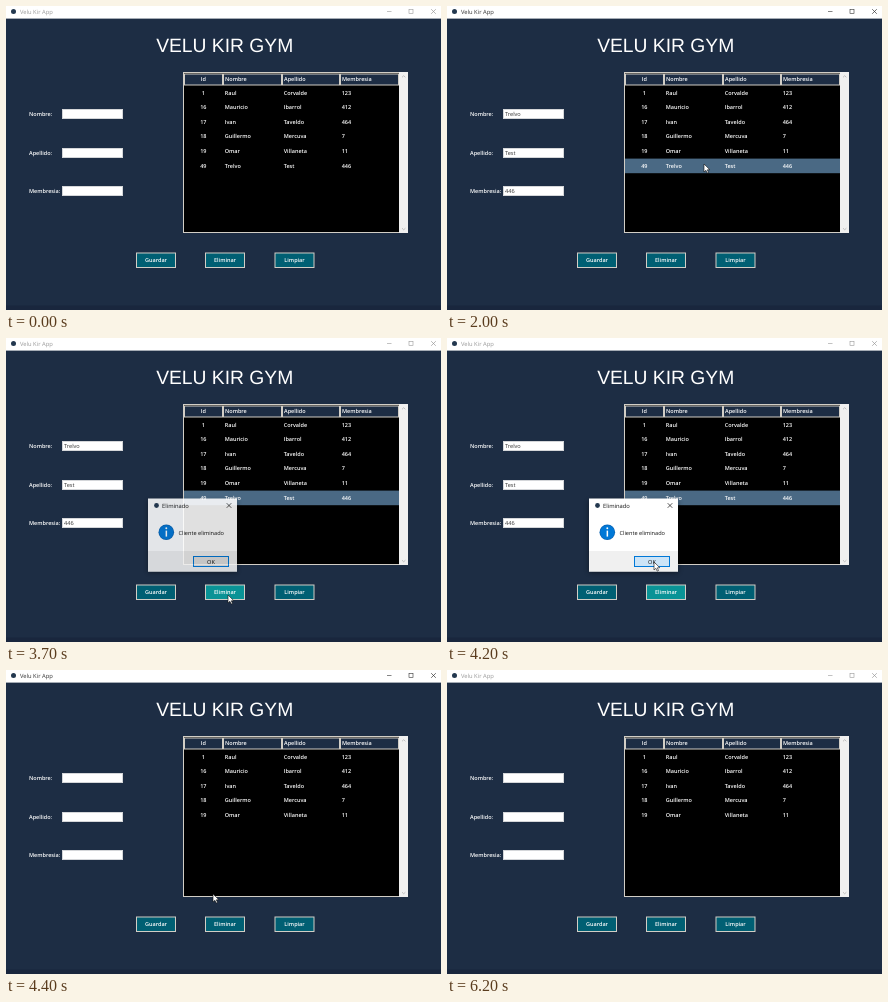
These frames come from a looping animation (435 by 304 pixels, 6300 ms). An HTML page with a canvas:

```html
<!DOCTYPE html>
<html lang="es">
<head>
<meta charset="utf-8">
<title>Velu Kir App</title>
<style>
  html, body { margin: 0; width: 100%; height: 100%; overflow: hidden; background: #1d2d44; }
  canvas { display: block; width: 435px; height: 304px; }
</style>
</head>
<body>
<canvas id="stage" width="435" height="304"></canvas>
<script>
const W = 435, H = 304, LOOP = 6300, STEP = 100;
const NAVY = '#1d2d44', EDGE = '#d2cec6', TEAL = '#005f73', HOVER = '#0a9396';
const UI = '"Open Sans", "Noto Sans", sans-serif';

const stage = document.getElementById('stage').getContext('2d');
const layer = Object.assign(document.createElement('canvas'), { width: W, height: H }).getContext('2d');
let ctx = stage;

const members = [
  ['1', 'Raul', 'Corvalde', '123'],
  ['16', 'Mauricio', 'Ibarrol', '412'],
  ['17', 'Ivan', 'Taveldo', '464'],
  ['18', 'Guillermo', 'Mercuva', '7'],
  ['19', 'Omar', 'Villaneta', '11'],
  ['49', 'Trelvo', 'Test', '446']
];
const columns = [
  { name: 'Id', x: 178, w: 39 },
  { name: 'Nombre', x: 217, w: 59 },
  { name: 'Apellido', x: 276, w: 58 },
  { name: 'Membresia', x: 334, w: 59 }
];

// [time, x, y]; the pointer moves straight from point to point.
const pointerPath = [
  [1200, 371, 297], [1800, 259, 161], [1900, 257, 158],
  [2400, 257, 158], [3000, 222.5, 262.5],
  [3200, 222.5, 262.5], [3500, 222, 257],
  [3700, 222, 257], [4100, 207, 224],
  [4600, 207, 224], [4900, 424, 20],
  [5000, 424, 20], [5200, 425, 8], [5500, 434, -8]
];

const between = (t, a, b) => t >= a && t < b;
const clamp = v => Math.max(0, Math.min(1, v));

function rect(x, y, w, h, color) {
  ctx.fillStyle = color;
  ctx.fillRect(x, y, w, h);
}

function framed(x, y, w, h, edge, fill) {
  rect(x, y, w, h, edge);
  rect(x + 1, y + 1, w - 2, h - 2, fill);
}

function text(str, x, y, color = '#fff', align = 'left', size = 5.5, weight = 600, family = UI) {
  ctx.font = `${weight} ${size}px ${family}`;
  ctx.textRendering = 'geometricPrecision';
  ctx.fillStyle = color;
  ctx.textAlign = align;
  ctx.fillText(str, x, y);
}

function path(points, color, width = 0.7) {
  ctx.beginPath();
  points.forEach(([x, y]) => ctx.lineTo(x, y));
  ctx.strokeStyle = color;
  ctx.lineWidth = width;
  ctx.stroke();
}

function disc(x, y, r, color) {
  ctx.beginPath();
  ctx.arc(x, y, r, 0, Math.PI * 2);
  ctx.fillStyle = color;
  ctx.fill();
}

function cross(x, y, r, color) {
  path([[x - r, y - r], [x + r, y + r]], color);
  path([[x + r, y - r], [x - r, y + r]], color);
}

function titleBar(active, closeGlow) {
  const ink = active ? '#333' : '#999';
  rect(0, 0, W, 12.6, '#fff');
  disc(7.5, 5.5, 2.5, '#23384f');
  text('Velu Kir App', 14, 8, ink, 'left', 5.8, 400);
  path([[381, 5.5], [385.5, 5.5]], ink, 0.6);
  ctx.strokeRect(403, 3.5, 4, 4);
  if (closeGlow > 0) {
    ctx.globalAlpha = closeGlow;
    rect(417, 0, 18, 12.3, '#e81123');
    ctx.globalAlpha = 1;
  }
  cross(427.5, 5.5, 2.3, closeGlow > 0.5 ? '#fff' : ink);
}

function form(values) {
  ['Nombre:', 'Apellido:', 'Membresia:'].forEach((label, i) => {
    const y = Math.round(103 + i * 38.5);
    text(label, 23, y + 7);
    framed(56, y, 61, 10, '#d4d6d9', '#fff');
    if (values) text(values[i], 58, y + 7, '#333', 'left', 5.6, 400);
  });
}

function scrollArrow(y, dir) {
  path([[396, y + dir], [397.7, y - dir], [399.4, y + dir]], '#aaa');
}

function table(rows, selected) {
  framed(177, 66, 217, 161, EDGE, '#000');
  columns.forEach((col, i) => {
    framed(col.x, 67.5, col.w, 12, EDGE, NAVY);
    if (i) text(col.name, col.x + 2, 75.2);
    else text(col.name, 197.3, 75.2, '#fff', 'center');
  });
  rows.forEach((row, r) => {
    const y = 79.6 + r * 14.6;
    if (r === selected) rect(178, y, 215, 14.6, '#4a6984');
    row.forEach((cell, c) => {
      if (c) text(cell, columns[c].x + 1.7, y + 9);
      else text(cell, 197.3, y + 9, '#fff', 'center');
    });
  });
  rect(393, 66, 9, 161, '#f0f0f0');
  scrollArrow(70.5, 0.8);
  scrollArrow(223, -0.8);
}

function bareScrollbar() {
  rect(393, 75, 9, 143.5, '#f0f0f0');
  rect(393, 75, 9, 7.5, '#cdcdcd');
}

function button(label, x, hot) {
  framed(x, 246.5, 40, 15.5, EDGE, hot ? HOVER : TEAL);
  text(label, x + 20, 256, '#fff', 'center');
}

function dialogBox(okColor) {
  ctx.shadowColor = 'rgba(0,0,0,.45)';
  ctx.shadowBlur = 5;
  ctx.shadowOffsetY = 1;
  rect(142, 160.5, 89, 73, '#fff');
  ctx.shadowColor = 'transparent';
  rect(142, 213, 89, 20.5, '#f0f0f0');
  disc(150.5, 167.5, 2.4, '#23384f');
  text('Eliminado', 156, 170, '#111', 'left', 5.8, 400);
  cross(223, 167.5, 2.3, '#111');
  disc(160.3, 194.3, 7.8, '#0a64b4');
  disc(160.3, 194.3, 7, '#0078d7');
  rect(159.6, 192.6, 1.5, 6, '#fff');
  disc(160.3, 190.3, 0.95, '#fff');
  text('Cliente eliminado', 172.5, 196.7, '#111', 'left', 5.6, 400);
  framed(187, 218, 36, 11, '#0078d7', okColor);
  text('OK', 205, 225.6, '#111', 'center', 5.6, 400);
}

// Drawn on its own layer so that the whole window fades as one sheet.
function dialog(alpha, scale, okColor) {
  ctx = layer;
  ctx.clearRect(0, 0, W, H);
  dialogBox(okColor);
  ctx = stage;
  ctx.save();
  ctx.globalAlpha = alpha;
  ctx.translate(186.5, 197);
  ctx.scale(scale, scale);
  ctx.drawImage(layer.canvas, -186.5, -197);
  ctx.restore();
}

function pointerAt(t) {
  if (!between(t, 1200, 5500)) return null;
  const i = pointerPath.findIndex(p => p[0] > t) - 1;
  const [t0, x0, y0] = pointerPath[i], [t1, x1, y1] = pointerPath[i + 1];
  const k = (t - t0) / (t1 - t0);
  return [x0 + (x1 - x0) * k, y0 + (y1 - y0) * k];
}

function pointer([x, y]) {
  const shape = [[0, 0], [0, 8], [1.9, 6.3], [3.2, 9.1], [4.5, 8.5], [3.3, 5.8], [5.8, 5.7]];
  ctx.beginPath();
  shape.forEach(([dx, dy]) => ctx.lineTo(x + dx, y + dy));
  ctx.closePath();
  ctx.fillStyle = '#fff';
  ctx.fill();
  ctx.strokeStyle = '#111';
  ctx.lineWidth = 0.6;
  ctx.stroke();
}

function dialogAlpha(t) {
  if (t < 3700) return 0.45;
  if (t < 3800) return 0.88;
  return t < 4300 ? 1 : 0.28;
}

function draw(t) {
  const active = between(t, 1900, 3600) || between(t, 4300, 6200);
  const closeGlow = between(t, 5200, 5600) ? clamp((5600 - t) / 300) : 0;
  const selected = between(t, 1900, 4300) ? 5 : -1;
  const filled = between(t, 2000, 4300);

  rect(0, 0, W, H, NAVY);
  rect(0, 299.5, W, 4.5, '#19263d');
  titleBar(active, closeGlow);
  text('VELU KIR GYM', 218.7, 46.2, '#fff', 'center', 19.3, 400, '"Liberation Sans", Arial, sans-serif');
  form(filled && members[5].slice(1));

  if (between(t, 4300, 4400)) bareScrollbar();
  else table(t < 4300 ? members : members.slice(0, 5), selected);

  button('Guardar', 130, false);
  button('Eliminar', 199, between(t, 3300, 4300));
  button('Limpiar', 268.5, false);

  if (between(t, 3600, 4400)) {
    const okColor = t < 4100 ? '#e1e1e1' : t < 4200 ? '#e5f1fb' : '#cce4f7';
    dialog(dialogAlpha(t), t < 4300 ? 1 : 0.965, okColor);
  }
  const spot = pointerAt(t);
  if (spot) pointer(spot);
}

function tick() {
  const t = performance.now() % LOOP;
  draw(Math.floor(t / STEP) * STEP);
  requestAnimationFrame(tick);
}
tick();
</script>
</body>
</html>
```
